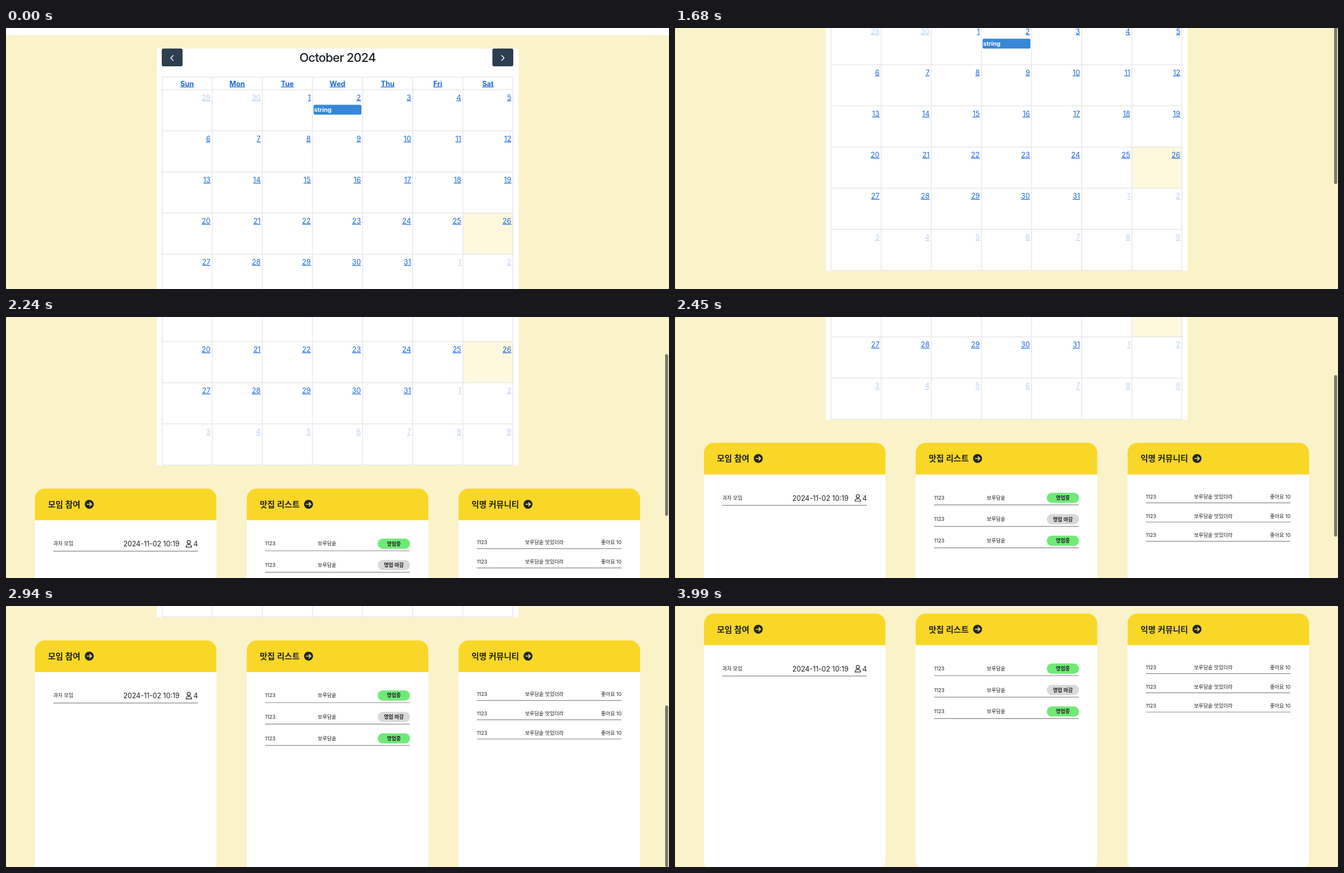
An HTML page that plays this animation: 1192x470 px, repeating every 6.37 s.

```html
<!DOCTYPE html>
<html lang="ko">
<head>
<meta charset="utf-8">
<title>Calendar page scroll</title>
<style>
  html, body { margin: 0; width: 100%; height: 100%; overflow: hidden; background: #77756c; }
  svg { display: block; border-radius: 2px; background: #faf2c9; }
  text { font-family: Inter, "Noto Sans CJK KR", "Noto Sans CJK", sans-serif; fill: #1d2125; }
  .title { font-size: 22px; font-weight: 500; letter-spacing: -.035em; }
  .link { font-size: 12.8px; fill: #1a68d6; text-decoration: underline; }
  .head { font-weight: 700; }
  .other { opacity: .3; }
  .event { font-size: 10.9px; font-weight: 700; fill: #fff; }
  .card { font-size: 14.8px; font-weight: 600; }
  .small { font-size: 9.1px; }
  .pill { font-size: 9.1px; font-weight: 600; }
  .date { font-size: 12.5px; }
</style>
</head>
<body>
<svg width="1192" height="470" viewBox="0 0 1192 470">
  <g id="page"></g>
  <rect id="thumb" x="1185" width="5.5" height="291" rx="2.75" fill="#000" fill-opacity=".5"/>
</svg>
<script>
const LOOP = 6370, STEP = 70;
const page = document.getElementById('page');
const thumb = document.getElementById('thumb');

const rect = (x, y, w, h, fill, rx = 0) =>
  `<rect x="${x}" y="${y}" width="${w}" height="${h}" rx="${rx}" fill="${fill}"/>`;
const path = (d, stroke, width = 1) =>
  `<path d="${d}" fill="none" stroke="${stroke}" stroke-width="${width}"/>`;
const text = (str, x, y, cls, anchor = 'start') =>
  `<text x="${x}" y="${y}" class="${cls}" text-anchor="${anchor}">${str}</text>`;

function calendar() {
  const left = 280.5, right = 911.5, top = 88.5, body = 111, colW = 631 / 7, rowH = 74.1;
  const bottom = body + 6 * rowH;
  let out = rect(271, 37, 650.5, 519.5, '#fff');
  for (const [x, dir] of [[280, -1], [874.5, 1]]) {
    const cx = x + 18.6;
    out += rect(x, 37, 37.5, 32, '#2c3e50', 3.2) +
      path(`M${cx - dir * 2.4} 49L${cx + dir * 2.4} 54L${cx - dir * 2.4} 59`, '#fff', 1.5);
  }
  out += text('October 2024', 596, 61, 'title', 'middle');
  out += rect(left + 6 * colW, body + 3 * rowH, colW, rowH, '#fef8df');

  let grid = `M${left} ${top}H${right}`;
  for (let r = 0; r <= 6; r++) grid += `M${left} ${body + r * rowH}H${right}`;
  for (let c = 0; c <= 7; c++) grid += `M${left + c * colW} ${top}V${bottom}`;
  out += path(grid, '#ddd');

  ['Sun', 'Mon', 'Tue', 'Wed', 'Thu', 'Fri', 'Sat'].forEach((day, c) => {
    out += text(day, left + (c + .5) * colW, 104.6, 'link head', 'middle');
  });
  for (let i = 0; i < 42; i++) {
    const date = new Date(2024, 8, 29 + i);
    const cls = date.getMonth() === 9 ? 'link' : 'link other';
    out += text(date.getDate(), left + (i % 7 + 1) * colW - 3,
      body + Math.floor(i / 7) * rowH + 18.5, cls, 'end');
  }
  return out + rect(553, 138.3, 86, 17.8, '#3788d8', 2.5) + text('string', 554, 151, 'event');
}

const underline = y => path(`M33 ${y}H293`, '#858585', 1.2);

function card(index, title, arrowX, rows) {
  const w = 326.5, h = 462, r = 18;
  return `<g transform="translate(${52 + index * 380.75} 598)">` +
    rect(0, 0, w, h, '#fff', r) +
    `<path d="M0 57V${r}a${r} ${r} 0 0 1 ${r} ${-r}H${w - r}a${r} ${r} 0 0 1 ${r} ${r}V57z" fill="#f9d727"/>` +
    text(title, 23.5, 34, 'card') +
    `<circle cx="${arrowX}" cy="28.3" r="8.1" fill="#212529"/>` +
    path(`M${arrowX - 4.5} 28.3h8.6m-3.6 -3.7l3.7 3.7l-3.7 3.7`, '#fbe67a', 1.6) +
    rows + '</g>';
}

function meetings() {
  return text('과자 모임', 33, 102.4, 'small') +
    text('2024-11-02 10:19', 260, 104.1, 'date', 'end') +
    '<circle cx="276.7" cy="96.2" r="2.9" fill="none" stroke="#222" stroke-width="1.2"/>' +
    path('M271.7 105.3c0-6.2 10-6.2 10 0z', '#222', 1.2) +
    text('4', 293.2, 104.1, 'date', 'end') + underline(112.7);
}

function restaurants() {
  return [true, false, true].map((open, i) => {
    const y = i * 38.6;
    return text('1123', 33, y + 102.4, 'small') +
      text('보루담솥', 144.5, y + 102.4, 'small', 'middle') +
      rect(235.6, y + 90, 58, 18.4, open ? '#70ea77' : '#d9d9d9', 9.2) +
      text(open ? '영업중' : '영업 마감', 264.6, y + 102.5, 'pill', 'middle') +
      underline(y + 112);
  }).join('');
}

function posts() {
  return [0, 1, 2].map(i => {
    const y = i * 34.7;
    return text('1123', 33, y + 100.4, 'small') +
      text('보루담솥 맛있더라', 154.5, y + 100.4, 'small', 'middle') +
      text('좋아요 10', 293.3, y + 100.4, 'small', 'end') + underline(y + 108.1);
  }).join('');
}

page.innerHTML = rect(0, 0, 1192, 13, '#fff') + calendar() +
  card(0, '모임 참여', 97.7, meetings()) +
  card(1, '맛집 리스트', 111.2, restaurants()) +
  card(2, '익명 커뮤니티', 125, posts());

// Scroll keys: time in ms, offset in px, speed in px per ms.
const keys = [
  [1050, 0, .1], [1120, 10.3, .21], [1680, 119, .05], [1750, 119, .05],
  [2240, 289, .4], [2730, 469.5, .31], [3220, 584.5, 0]
];

function scrollAt(t) {
  if (t <= keys[0][0]) return 0;
  const i = keys.findIndex(key => t <= key[0]);
  if (i < 0) return keys[keys.length - 1][1];
  const [t0, p0, v0] = keys[i - 1], [t1, p1, v1] = keys[i];
  const d = t1 - t0, u = (t - t0) / d, n = 1 - u;
  return p0 * n * n * (1 + 2 * u) + p1 * u * u * (3 - 2 * u) +
    d * u * n * (v0 * n - v1 * u);
}

function draw(now) {
  const t = Math.floor((now % LOOP) / STEP) * STEP;
  const scroll = scrollAt(t);
  page.setAttribute('transform', `translate(0 ${-scroll})`);
  thumb.setAttribute('y', scroll * .4535 - 64);
  thumb.setAttribute('opacity', t < 1120 ? 0 : Math.max(0, Math.min(1, (3990 - t) / 280)));
}

const start = performance.now();
function tick() {
  draw(performance.now() - start);
  requestAnimationFrame(tick);
}
tick();
</script>
</body>
</html>
```
